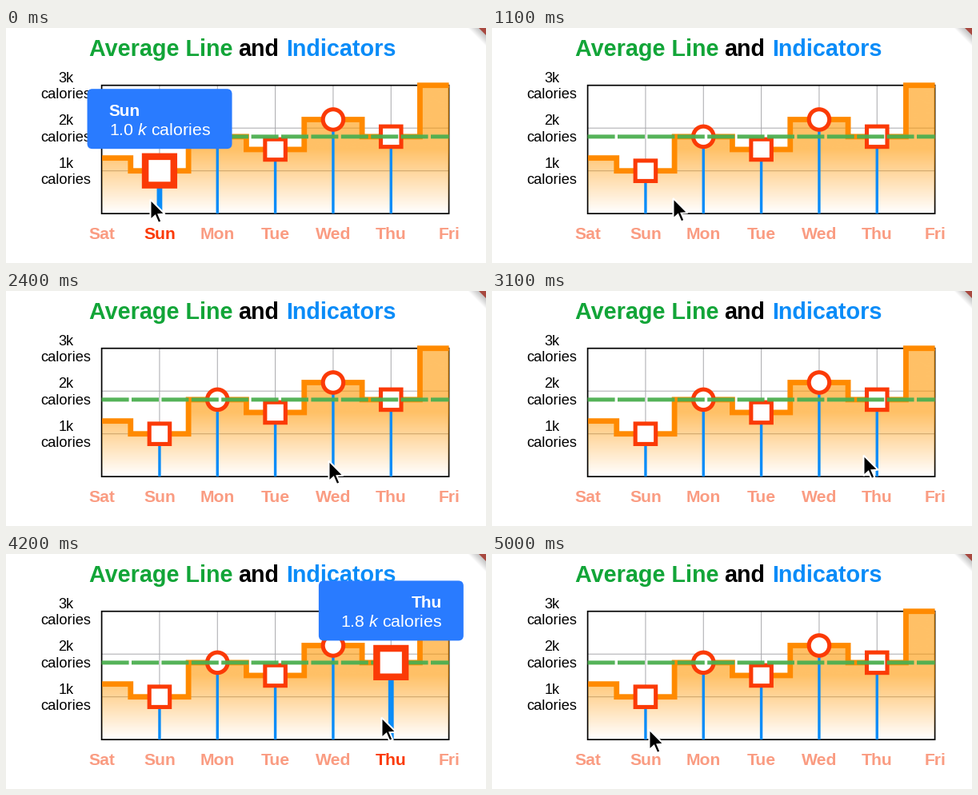
Recreate the animation shown at these times as a matplotlib script. Size 600 px wide and 294 px high, loop 5100 ms.

```python
import numpy as np
import matplotlib.pyplot as plt
from matplotlib.animation import FuncAnimation
from matplotlib.patches import Circle, FancyBboxPatch, Polygon, Rectangle

W, H, DPI = 600, 294, 100
FRAMES, INTERVAL = 51, 100
PT = 72 / DPI  # points per pixel

LEFT, RIGHT, TOP, BOTTOM = 119.6, 553.6, 71.7, 232.2
DAYS = ["Sat", "Sun", "Mon", "Tue", "Wed", "Thu", "Fri"]
VALUES = [1.3, 1.0, 1.8, 1.5, 2.2, 1.8, 3.0]
AVERAGE = 1.8

ORANGE, RED, BLUE = "#ff8a00", "#fb3a06", "#0a8cf8"
FADED_RED = "#fa9c82"
GREEN, TITLE_GREEN, TOOLTIP_BLUE = "#4caf50", "#12a538", "#297bff"

# (first frame, last frame, day index) while a point is pressed
PRESSES = [(0, 9, 1), (14, 20, 2), (25, 28, 4), (33, 43, 5)]
# (frame, x, y) stops of the pointer tip
STOPS = [(0, 180, 213), (6, 183.5, 212), (9, 186, 212), (13, 266, 211),
         (18, 268, 211), (20, 270, 211), (24, 403, 211), (28, 406, 210),
         (31, 464, 204), (42, 469, 203), (44, 468, 204), (50, 196, 218),
         (51, 180, 213)]
ARROW = 1.6 * np.array([(0, 0), (0, 16), (3.7, 12.7), (6.2, 18.4),
                        (8.7, 17.3), (6.3, 11.7), (11.3, 11.4)])

plt.rcParams.update({
    "font.family": "Liberation Sans",
    "mathtext.fontset": "custom",
    "mathtext.rm": "Liberation Sans",
    "mathtext.it": "Liberation Sans:italic",
    "path.snap": False,
})

fig = plt.figure(figsize=(W / DPI, H / DPI), dpi=DPI, facecolor="white")
ax = fig.add_axes([0, 0, 1, 1])


def px(day):
    return LEFT + (RIGHT - LEFT) * day / 6


def py(value):
    return BOTTOM - (BOTTOM - TOP) * value / 3


def line(xs, ys, color, width, z, **kw):
    return ax.plot(xs, ys, color=color, lw=width * PT, zorder=z,
                   solid_capstyle="butt", dash_capstyle="butt",
                   solid_joinstyle="miter", **kw)[0]


def label(x, y, text, size, color="black", z=8, **kw):
    kw.setdefault("ha", "center")
    return ax.text(x, y, text, fontsize=size * PT, color=color, zorder=z,
                   va="baseline", **kw)


def dot(day, hole, stroke, z):
    """White marker with a red rim; round on even days, square on odd ones."""
    x, y, r = px(day), py(VALUES[day]), (hole + stroke) / 2
    style = dict(facecolor="white", edgecolor=RED, lw=stroke * PT, zorder=z)
    if day % 2 == 0:
        mark = Circle((x, y), r, **style)
    else:
        mark = Rectangle((x - r, y - r), 2 * r, 2 * r,
                         joinstyle="miter", **style)
    return ax.add_patch(mark)


def tooltip(day):
    x, top = px(day) - 90.4, py(VALUES[day]) - 102.5
    box = FancyBboxPatch((x, top), 181, 75, lw=0, zorder=20,
                         boxstyle="round,pad=0,rounding_size=6.5",
                         facecolor=TOOLTIP_BLUE)
    ax.add_patch(box)
    align, dx = {1: ("left", 27), 5: ("right", 154)}.get(day, ("center", 90.5))
    name = label(x + dx, top + 34, DAYS[day], 20.8, "white", 21,
                 ha=align, weight="bold")
    amount = label(x + dx, top + 58, f"{VALUES[day]:.1f} $k$ calories",
                   21.4, "white", 21, ha=align)
    return [box, name, amount]


def draw_title():
    for x, text, color in [(194, "Average Line", TITLE_GREEN),
                           (315.5, "and", "black"),
                           (419.3, "Indicators", BLUE)]:
        label(x, 35, text, 28.7, color, weight="bold")


def draw_ribbon():
    def corner(size, color, alpha):
        ax.add_patch(Polygon([(W - size, 0), (W, 0), (W, size)], lw=0,
                             facecolor=color, alpha=alpha, zorder=1))

    for size in range(22, 8, -2):  # soft shadow
        corner(size, "black", 0.035)
    corner(9, "#a8483f", 1)


def draw_chart():
    for day in range(1, 6):
        line([px(day)] * 2, [TOP, BOTTOM], "#a9a9ad", 1, 1)
    for k in (1, 2):
        line([LEFT, RIGHT], [py(k)] * 2, "#a9a9ad", 1, 1)
    ax.add_patch(Rectangle((LEFT, TOP), RIGHT - LEFT, BOTTOM - TOP, fill=False,
                           edgecolor="black", lw=1.7 * PT, zorder=1.5))
    for k in (1, 2, 3):
        label(75, py(k) - 4, f"{k}k", 18)
        label(74.8, py(k) + 16.5, "calories", 18.3)

    edges = [LEFT, *np.repeat([px(d + 0.5) for d in range(6)], 2), RIGHT]
    steps = np.repeat([py(v) for v in VALUES], 2)
    curve = line(edges, steps, ORANGE, 6.8, 4)
    curve.set_clip_path(Rectangle((LEFT, 0), RIGHT - LEFT, H,
                                  transform=ax.transData))

    # area: even tint in the upper half, fading out below
    fade = np.ones((160, 1, 4))
    fade[..., :3] = (1.0, 0.595, 0.0)
    fade[:, 0, 3] = 0.6 * np.clip(2 - 2 * np.linspace(0, 1, 160), 0, 1)
    area = ax.imshow(fade, extent=(LEFT, RIGHT, BOTTOM, TOP), aspect="auto",
                     origin="upper", zorder=2)
    outline = [(LEFT, BOTTOM), *zip(edges, steps), (RIGHT, BOTTOM)]
    area.set_clip_path(Polygon(outline, transform=ax.transData))

    # runs across resting markers, but under a pressed one
    line([LEFT, RIGHT], [py(AVERAGE)] * 2, GREEN, 5, 5.5, alpha=0.95,
         linestyle=(0, (34 / 5, 3.4 / 5)))


draw_title()
draw_ribbon()
draw_chart()

names = [label(px(d), 263.5, DAYS[d], 21.2, FADED_RED, weight="bold")
         for d in range(7)]
normal, pressed = {}, {}
for d in range(1, 6):
    span = [px(d)] * 2, [py(VALUES[d]), BOTTOM]
    normal[d] = [line(*span, BLUE, 3.4, 3), dot(d, 20.4, 5.1, 5)]
    pressed[d] = [line(*span, BLUE, 6.8, 6), dot(d, 27.2, 8.5, 7), *tooltip(d)]

pointer = ax.add_patch(Polygon(ARROW, facecolor="black", edgecolor="white",
                               lw=2 * PT, zorder=30))

ax.set_xlim(0, W)
ax.set_ylim(H, 0)
ax.axis("off")


def pointer_at(frame):
    for (f0, x0, y0), (f1, x1, y1) in zip(STOPS, STOPS[1:]):
        if frame <= f1:
            t = (frame - f0) / (f1 - f0)
            t = t * t * (3 - 2 * t)
            return np.array([x0 + (x1 - x0) * t, y0 + (y1 - y0) * t])


def update(frame):
    active = next((d for a, b, d in PRESSES if a <= frame <= b), None)
    for d in normal:
        for artist in normal[d]:
            artist.set_visible(d != active)
        for artist in pressed[d]:
            artist.set_visible(d == active)
        names[d].set_color(RED if d == active else FADED_RED)
    pointer.set_xy(ARROW + pointer_at(frame) + (0.5, 1.5))
    return []


anim = FuncAnimation(fig, update, frames=FRAMES, interval=INTERVAL,
                     repeat=True, repeat_delay=0, blit=False)
plt.show()
```
